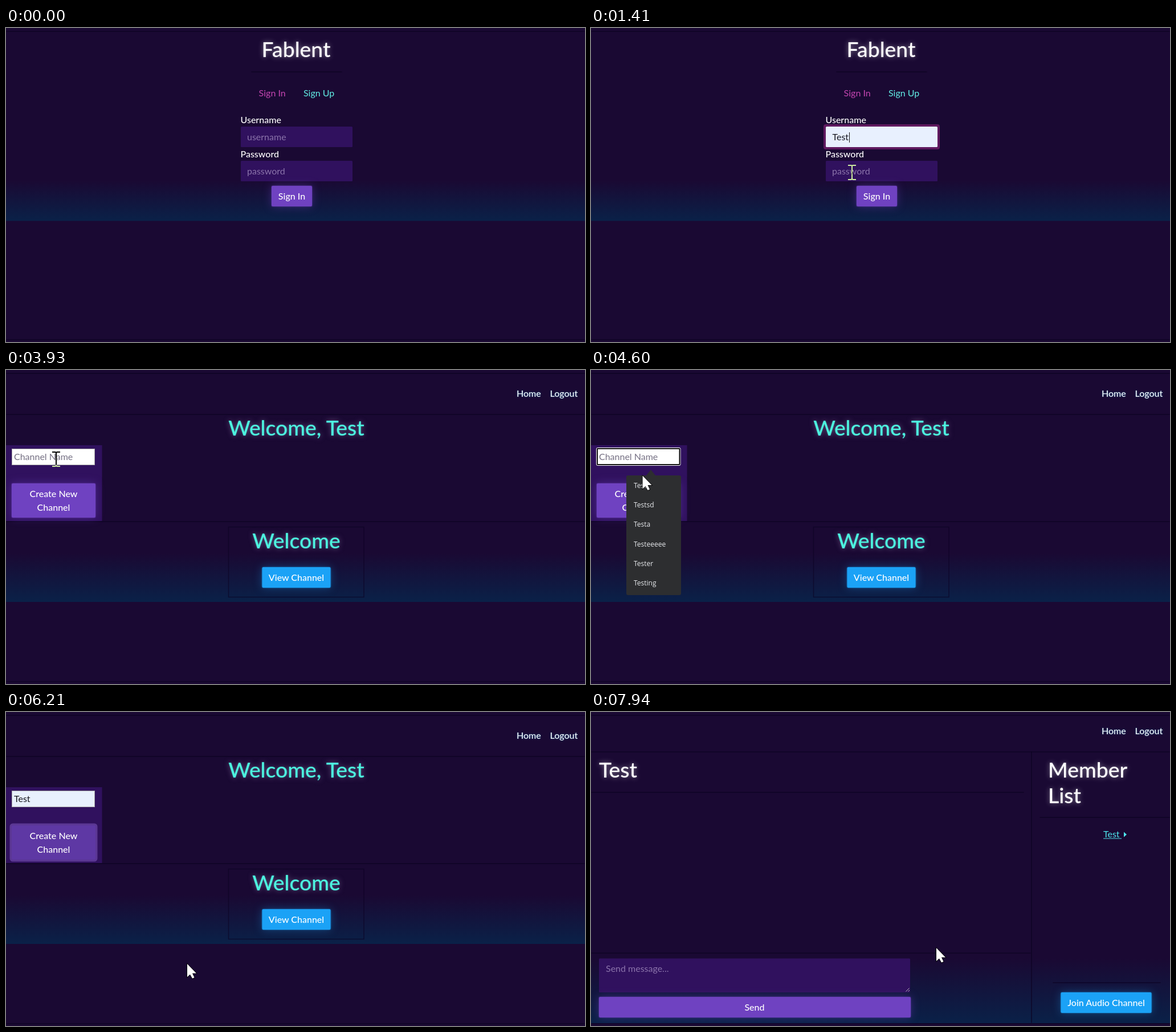
An HTML page that plays this animation: 1016x551 px, repeating every 8000 ms.

```html
<!DOCTYPE html>
<html lang="en">
<head>
<meta charset="utf-8">
<title>Chat sign in</title>
<style>
html, body { margin: 0; width: 100%; height: 100%; overflow: hidden; background: #1a0933; }
svg { display: block; width: 100%; height: 100%; }
text { font: 16px Lato, sans-serif; fill: #fff; white-space: pre; }
.h1 { font-size: 37.3px; font-weight: 500; filter: drop-shadow(0 0 1px #fff4) drop-shadow(0 0 5px #fff6); }
.cyan { fill: #4df5e0; filter: drop-shadow(0 0 1px #32fbe255) drop-shadow(0 0 5px #b08ac080); }
.mid { text-anchor: middle; }
.strong { font-weight: 500; }
.hint { fill: #8b74ab; }
.ink { fill: #15151d; }
.nav { font-weight: 500; fill: #f4ffff; filter: drop-shadow(0 0 1.500px #1ba2f666); }
.line { fill: #0d0322; opacity: .6; }
.violet { fill: #6f42c1; filter: drop-shadow(0 0 1px #6f42c1cc) drop-shadow(0 0 8px #6f42c166); }
.blue { fill: #1ba2f6; filter: drop-shadow(0 0 1px #1ba2f6cc) drop-shadow(0 0 8px #1ba2f64d); }
.ring { fill: #5e38a4; stroke: #855eca80; stroke-width: 7; stroke-linejoin: round; paint-order: stroke; }
.glow { fill: none; stroke: #ea39b855; stroke-width: 4; }
.item { font: 12px "Open Sans", sans-serif; fill: #e8eaed; }
#beam { fill: none; stroke: #fff; stroke-width: 2; mix-blend-mode: difference; }
#arrow, #hand { fill: #fff; stroke: #000; stroke-width: 1.500; paint-order: stroke; }
</style>
</head>
<body>
<svg id="stage" viewBox="0 0 1016 551" preserveAspectRatio="none"></svg>
<script>
const LOOP = 8000;
const $ = id => document.getElementById(id);
const rect = (x, y, w, h, fill, extra = '') =>
  `<rect x="${x}" y="${y}" width="${w}" height="${h}" fill="${fill}" ${extra}/>`;
const box = (x, y, w, h, cls, id = '') =>
  `<rect x="${x}" y="${y}" width="${w}" height="${h}" rx="2" class="${cls}" id="${id}"/>`;
const line = (x, y, w, h = 2) => box(x, y, w, h, 'line');
const label = (x, y, str, cls = '', id = '') => `<text x="${x}" y="${y}" class="${cls}" id="${id}">${str}</text>`;
const group = (id, ...parts) => `<g id="${id}">${parts.join('')}</g>`;
const backdrop = height => rect(0, 0, 1016, 551, '#1a0933') +
  rect(0, height * .79, 1016, height * .21, 'url(#dusk)') + line(0, 5, 1016) + line(0, 546, 1016);
const nav = y => label(896, y, 'Home', 'nav') + label(954.5, y, 'Logout', 'nav');

const names = ['Test', 'Testsd', 'Testa', 'Testeeeee', 'Tester', 'Testing'];
const menu = (id, x, y) => `<g id="${id}"><g transform="translate(${x} ${y})">
  <path d="M35 0 43 -10 51 0Z" fill="#2d2e30"/>${rect(0, 0, 96, 210, '#2d2e30', 'rx="3"')}
  ${rect(0, 3, 96, 33, '#4a4b4e', `id="${id}Row"`)}
  ${names.map((name, i) => label(13, 22 + i * 34.2, name, 'item')).join('')}</g></g>`;

const dots = Array.from({ length: 13 }, (_, i) =>
  `<circle cx="${428 + i * 9.25}" cy="252.3" r="3.6" fill="#fff"/>`).join('');

const signIn = group('signIn', backdrop(338.5),
  label(509, 51, 'Fablent', 'h1 mid'), line(430, 76, 160),
  label(443.5, 119.5, 'Sign In', 'strong', 'tab'), label(522, 119.5, 'Sign Up', '', 'tabUp'),
  label(411.5, 167, 'Username', 'strong'), label(411.5, 227, 'Password', 'strong'),
  box(410, 171, 200, 40, 'glow', 'userGlow'), rect(412, 173, 196, 36, '#30115e', 'rx="1.5" id="userField"'),
  label(423, 197, 'username', 'hint', 'userHint'), label(423.5, 197, 'Test', 'ink', 'userText'),
  rect(453, 183, 1, 18, '#111', 'id="userCaret"'),
  box(410, 231, 200, 40, 'glow', 'passGlow'), rect(412, 233, 196, 36, '#30115e', 'rx="1.5"'),
  label(423, 257, 'password', 'hint', 'passHint'), group('passDots', dots),
  rect(424, 243, 1, 18, '#fff', 'id="passCaret"'),
  box(466, 277, 71, 36, 'violet', 'signBtn'), box(466, 277, 71, 36, 'ring', 'signRing'),
  label(501.5, 301, 'Sign In', 'mid strong'), menu('userMenu', 464, 227));

const home = group('home', backdrop(407), nav(47), line(0, 77, 1016), line(0, 265, 1016),
  label(509.5, 115, 'Welcome, Test', 'h1 cyan mid'),
  rect(0, 132, 168.5, 133, '#30115e'),
  rect(10.5, 138.5, 145, 28, '#fff', 'stroke="#a9a9a9" id="nameField"'),
  group('nameFocus', rect(9.5, 136.5, 147.5, 31, 'none', 'rx="2" stroke="#fff"'),
    rect(11, 138, 144.5, 28, 'none', 'rx="1" stroke="#101010" stroke-width="2"')),
  label(14, 158, 'Channel Name', '', 'nameHint'), label(14, 158, 'Test', 'ink', 'nameText'),
  rect(43, 143, 1, 18, '#111', 'id="nameCaret"'),
  box(10, 199, 147, 60, 'violet', 'newBtn'), box(10, 199, 147, 60, 'ring', 'newRing'),
  label(83.5, 223, 'Create New', 'mid strong'), label(83.5, 247, 'Channel', 'mid strong'),
  rect(390.5, 275.5, 237.5, 123, 'none', 'stroke="#0d0322" stroke-width="1.5" opacity=".6"'),
  label(509.5, 313, 'Welcome', 'h1 cyan mid'),
  box(449.5, 346, 120, 36, 'blue'), label(509.5, 370, 'View Channel', 'mid strong'),
  menu('nameMenu', 62, 185));

const channel = group('channel', backdrop(546), nav(39),
  line(0, 69, 1016), line(0, 140, 760), line(772, 69, 2, 477), line(787, 184, 229),
  line(0, 422, 772), line(810, 474, 190),
  label(14, 115, 'Test', 'h1'), label(802, 115, 'Member', 'h1'), label(802, 160, 'List', 'h1'),
  `<text x="899" y="220" style="fill:#4ee8ee">Test</text>`, rect(899, 221.5, 32, 1, '#4ee8ee'),
  '<path d="M935 210.5v9l5-4.5Z" fill="#4ee8ee"/>',
  rect(14, 432.5, 546, 59.5, '#30115e', 'rx="1.5"'), label(26, 456, 'Send message...', 'hint'),
  '<path d="M552.5 490.5l6-6M556.5 490.5l2.5-2.5" stroke="#bbb" fill="none"/>',
  box(14, 500, 547, 36, 'violet'), label(287, 524, 'Send', 'mid strong'),
  box(824.5, 492, 159, 36, 'blue'), label(904, 516, 'Join Audio Channel', 'mid strong'));

$('stage').innerHTML = `<defs><linearGradient id="dusk" x2="0" y2="1">
  <stop stop-color="#0a2148" stop-opacity="0"/><stop offset="1" stop-color="#0a2148"/></linearGradient></defs>
  ${signIn}${home}${channel}
  <path id="arrow" d="M0 0V23L5 18.5 9 25.5 12.5 24 9 16.500H16Z"/>
  <path id="hand" d="M-2 1.5Q0-1.5 2 1.5V9Q5 7.5 6 10 9 8.5 10 11.5 13.5 10.5 14 14V20Q14 25 11 29H0Q-3 24-8 18-10 14-7 14-5 14-2 18Z"/>
  <path id="beam" d="M-7-12H-2Q0-12 0-10 0-12 2-12H7M0-10V11M-7 13H-2Q0 13 0 10 0 13 2 13H7"/>`;
$('tab').style.fill = '#b841a8';
$('tabUp').style.fill = '#62efe6';
$('nameHint').style.fill = '#757083';

// time, x, y, pointer shape from then on
const path = [
  [250, 800, 455, 'arrow'], [480, 660, 330, 'arrow'], [740, 488, 200, 'beam'], [1000, 470, 193, 'beam'],
  [1140, 478, 215, 'arrow'], [1260, 482, 241, 'arrow'], [1340, 465, 250, 'beam'], [1410, 458, 253, 'beam'],
  [2180, 458, 253, 'beam'], [2400, 485, 290, 'hand'], [2600, 487, 294, 'hand'], [2860, 475, 384, 'hand'],
  [2930, 467, 411, 'arrow'], [3120, 467, 411, 'arrow'], [3420, 330, 330, 'arrow'], [3700, 140, 190, 'arrow'],
  [3800, 100, 160, 'beam'], [3930, 88, 156, 'beam'], [4380, 88, 156, 'beam'], [4560, 90, 180, 'arrow'],
  [4740, 92, 200, 'arrow'], [5150, 92, 200, 'hand'], [5220, 92, 204, 'hand'], [5410, 94, 215, 'hand'],
  [5940, 94, 215, 'hand'], [6030, 130, 270, 'arrow'], [6210, 318, 442, 'arrow'], [6400, 699, 527, 'arrow'],
  [6800, 695, 527, 'arrow'], [6980, 520, 475, 'arrow'], [7120, 367, 380, 'arrow'], [7260, 455, 286, 'arrow'],
  [7400, 590, 350, 'arrow'], [7540, 610, 436, 'arrow'], [7860, 610, 436, 'arrow'], [7940, 606, 414, 'arrow'],
  [LOOP, 606, 414, 'arrow']];
const TICK = 200 / 3;

const show = (id, on) => { $(id).style.opacity = +on; };
const within = (t, from, to) => t >= from && t < to;
const ramp = (t, from, to) => Math.min(1, Math.max(0, (t - from) / (to - from)));

function drawPointer(time) {
  const t = Math.round(Math.floor((time + 12) / TICK) * TICK + 10);
  const i = path.findLastIndex(p => p[0] <= t);
  ['arrow', 'hand', 'beam'].forEach(id => show(id, i >= 0 && path[i][3] === id));
  if (i < 0) return;
  const [from, x, y, shape] = path[i], [to, nx, ny] = path[i + 1] || path[i];
  const k = to > from ? ramp(t, from, to) : 0;
  $(shape).setAttribute('transform', `translate(${x + (nx - x) * k} ${y + (ny - y) * k})`);
}

function draw(t) {
  $('signIn').style.display = t < 2930 ? '' : 'none';
  $('home').style.display = within(t, 2930, 7620) ? '' : 'none';
  $('channel').style.display = t >= 7620 ? '' : 'none';

  const userFilled = t >= 1200;
  show('userGlow', ramp(t, 790, 940) - ramp(t, 1720, 1870));
  $('userField').setAttribute('fill', userFilled ? '#e8f0fe' : '#30115e');
  show('userHint', !userFilled);
  show('userText', userFilled);
  show('userCaret', within(t, 1330, 1730));
  show('userMenu', ramp(t, 860, 1000) - ramp(t, 1300, 1400));
  show('userMenuRow', userFilled);

  const passFilled = t >= 1930;
  show('passGlow', ramp(t, 1720, 1870) - ramp(t, 2530, 2680));
  show('passHint', !passFilled);
  show('passDots', passFilled);
  show('passCaret', within(t, 1730, 2190));
  $('passCaret').setAttribute('x', passFilled ? 545 : 424);
  show('signBtn', t < 2600);
  show('signRing', ramp(t, 2520, 2680));

  const nameFilled = t >= 4740;
  $('nameField').setAttribute('fill', nameFilled ? '#e8f0fe' : '#fff');
  show('nameFocus', within(t, 4000, 5940));
  show('nameHint', !nameFilled);
  show('nameText', nameFilled);
  show('nameCaret', within(t, 5110, 5610));
  show('nameMenu', ramp(t, 4000, 4190) - ramp(t, 4980, 5097));
  show('nameMenuRow', nameFilled);
  const hover = ramp(t, 5150, 5410);
  $('newBtn').style.fill = `color-mix(in srgb, #5e38a4 ${hover * 100}%, #6f42c1)`;
  show('newBtn', t < 6080);
  show('newRing', ramp(t, 5940, 6090));
  drawPointer(t);
}

const start = performance.now();
(function frame() {
  draw((performance.now() - start) % LOOP);
  requestAnimationFrame(frame);
})();
</script>
</body>
</html>
```
